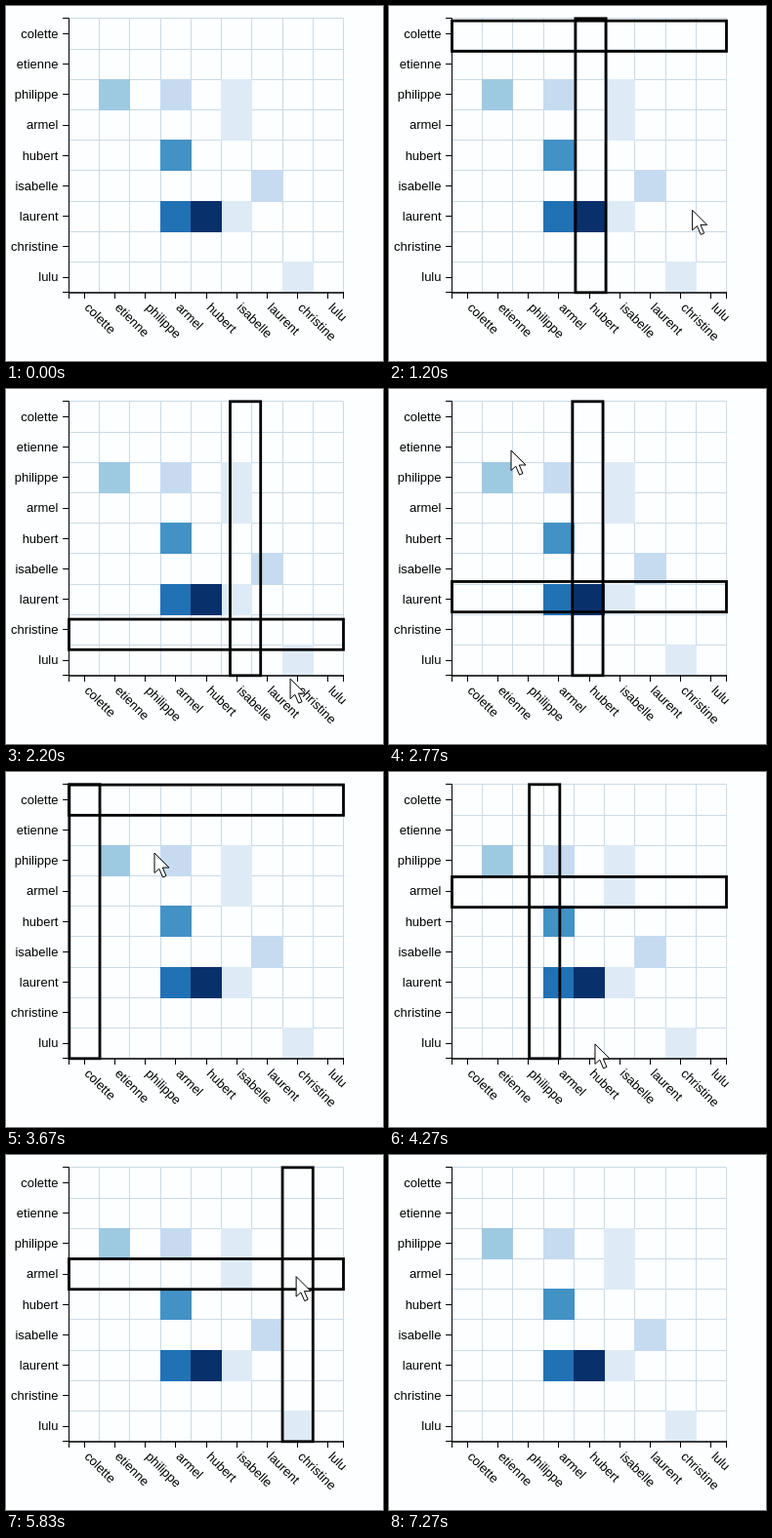
An HTML page that plays this animation: 386x364 px, repeating every 7310 ms.

```html
<!DOCTYPE html>
<html lang="fr">
<head>
<meta charset="utf-8">
<title>Matrix hover</title>
<style>
  html, body { margin: 0; width: 100%; height: 100%; overflow: hidden; background: #fcfeff; }
  svg { display: block; }
  text { font: 13px "Liberation Sans", Arial, sans-serif; fill: #000; }
  .grid { stroke: #cbdae6; }
  .axis { stroke: #000; fill: none; }
  .base { stroke-width: 1.5; }
  .box { stroke: #000; stroke-width: 2.8; fill: none; }
</style>
</head>
<body>
<svg id="stage" width="386" height="364" viewBox="0 0 386 364"></svg>
<script>
const LOOP = 7310, STEP = 5;
const LEFT = 64.5, TOP = 12.8, SIZE = 281, N = 9, CELL = SIZE / N;
const RIGHT = LEFT + SIZE, BOTTOM = TOP + SIZE;
const SHOW = 30, BOX_END = 6600, HIDE = 7250; // pointer enters, boxes vanish, pointer leaves
const EASE_MS = 250, REST_MS = 260;
const names = ["colette", "etienne", "philippe", "armel", "hubert",
  "isabelle", "laurent", "christine", "lulu"];
// Colour, then the column and row of each cell that has it
const cells = {
  "#deebf7": [[5, 2], [5, 3], [5, 6], [7, 8]],
  "#c6dbef": [[3, 2], [6, 5]],
  "#9ecae1": [[1, 2]],
  "#4292c6": [[3, 4]],
  "#2171b5": [[3, 6]],
  "#08306b": [[4, 6]]
};
// Pointer stops: arrival time, x, y
const stops = [
  [30, 300, 326], [700, 200, 6], [1380, 258, 216], [1740, 246, 246], [2375, 205, 216],
  [2735, 125, 63], [3305, 80, 28], [3665, 152, 83], [4430, 140, 250], [4790, 55, 279],
  [5560, 297, 124], [6250, 100, 200], [6600, 320, 303], [7250, 14, 146]
];

const stage = document.getElementById("stage");
function add(tag, attrs, text = "") {
  const el = document.createElementNS("http://www.w3.org/2000/svg", tag);
  for (const key in attrs) el.setAttribute(key, attrs[key]);
  el.textContent = text;
  return stage.appendChild(el);
}
const path = (cls, d) => add("path", { class: cls, d });
const edgeX = i => Math.floor(LEFT + i * CELL);
const edgeY = i => Math.floor(TOP + i * CELL);

for (let i = 0; i <= N; i++) {
  path("grid", `M${edgeX(i) + 0.5} ${TOP}V${BOTTOM}`);
  path("grid", `M${LEFT} ${edgeY(i) + 0.5}H${RIGHT}`);
}
for (const fill in cells)
  for (const [col, row] of cells[fill]) {
    const x = edgeX(col), y = edgeY(row);
    add("rect", { x, y, fill, width: edgeX(col + 1) - x + 1, height: edgeY(row + 1) - y + 1 });
  }

path("axis", "M58 12.5H64.5V293.5H58M64.5 300V293.5M345.5 293.5V300");
path("axis base", "M64 294H346");
names.forEach((name, i) => {
  const x = LEFT + (i + 0.5) * CELL, y = TOP + (i + 0.5) * CELL;
  path("axis", `M58 ${Math.floor(y) + 0.5}H64M${Math.floor(x) + 0.5} 294V300`);
  add("text", { x: 53.5, y: y + 4.2, "text-anchor": "end" }, name);
  add("text", { x: 11, y: 11.5, transform: `translate(${x} 294) rotate(45)` }, name);
});

const column = add("rect", { class: "box", y: TOP, width: CELL, height: SIZE });
const band = add("rect", { class: "box", x: LEFT, width: SIZE, height: CELL });
const arrow = add("path", {
  d: "M0 0V20.5L4.8 16.2L8.6 25L12 23.5L8.3 15H15Z", fill: "#fff", stroke: "#000"
});
const beam = add("path", {
  d: "M-3 -8Q0 -8 0 -6Q0 -8 3 -8M0 -6V6M-3 8Q0 8 0 6Q0 8 3 8", fill: "none", stroke: "#000"
});

const clamp = (v, lo, hi) => Math.min(hi, Math.max(lo, v));
const mix = (a, b, p) => a + (b - a) * p;
const smooth = p => p * p * (3 - 2 * p);
const cubic = p => p < 0.5 ? 4 * p ** 3 : 1 - 4 * (1 - p) ** 3;
const cellAt = (v, start) => clamp(Math.floor((v - start) / CELL), 0, N - 1);
const show = (el, on) => el.setAttribute("visibility", on ? "visible" : "hidden");

// The pointer rests at each stop, then glides on; longer glides bend more.
function pointer(t) {
  const i = Math.max(0, stops.findLastIndex(s => s[0] <= t));
  const [time, x, y] = stops[i];
  const [end, toX, toY] = stops[Math.min(i + 1, stops.length - 1)];
  const glide = Math.max(1, end - time - REST_MS);
  const p = smooth(clamp((t - time - REST_MS) / glide, 0, 1));
  const bend = Math.max(0, glide - 100) * 0.25 * Math.sin(Math.PI * p);
  return [mix(x, toX, p) + bend, mix(y, toY, p) + bend];
}

// Every newly hovered cell restarts the boxes' transition from where they are.
function traceBoxes() {
  const trace = [];
  let from, to, now, since = 0;
  for (let t = 0; t <= LOOP; t += STEP) {
    const [x, y] = pointer(t);
    const cell = [cellAt(x, LEFT), cellAt(y, TOP)];
    if (!to) from = to = now = cell;
    if (cell[0] !== to[0] || cell[1] !== to[1]) {
      from = now;
      to = cell;
      since = t;
    }
    const p = cubic(clamp((t - since) / EASE_MS, 0, 1));
    now = from.map((v, k) => mix(v, to[k], p));
    trace.push(now);
  }
  return trace;
}
const boxes = traceBoxes();

function draw(t) {
  const active = t >= SHOW && t < HIDE;
  const [col, row] = boxes[Math.floor(t / STEP)];
  column.setAttribute("x", LEFT + CELL * col);
  band.setAttribute("y", TOP + CELL * row);
  for (const el of [column, band]) show(el, active && t < BOX_END);

  const [x, y] = pointer(t);
  const onLabel = x < 57 || (y > 304 && y < 336);
  for (const el of [arrow, beam]) el.setAttribute("transform", `translate(${x} ${y})`);
  show(arrow, active && !onLabel);
  show(beam, active && onLabel);
}

const start = performance.now();
function tick() {
  draw((performance.now() - start) % LOOP);
  requestAnimationFrame(tick);
}
tick();
</script>
</body>
</html>
```
